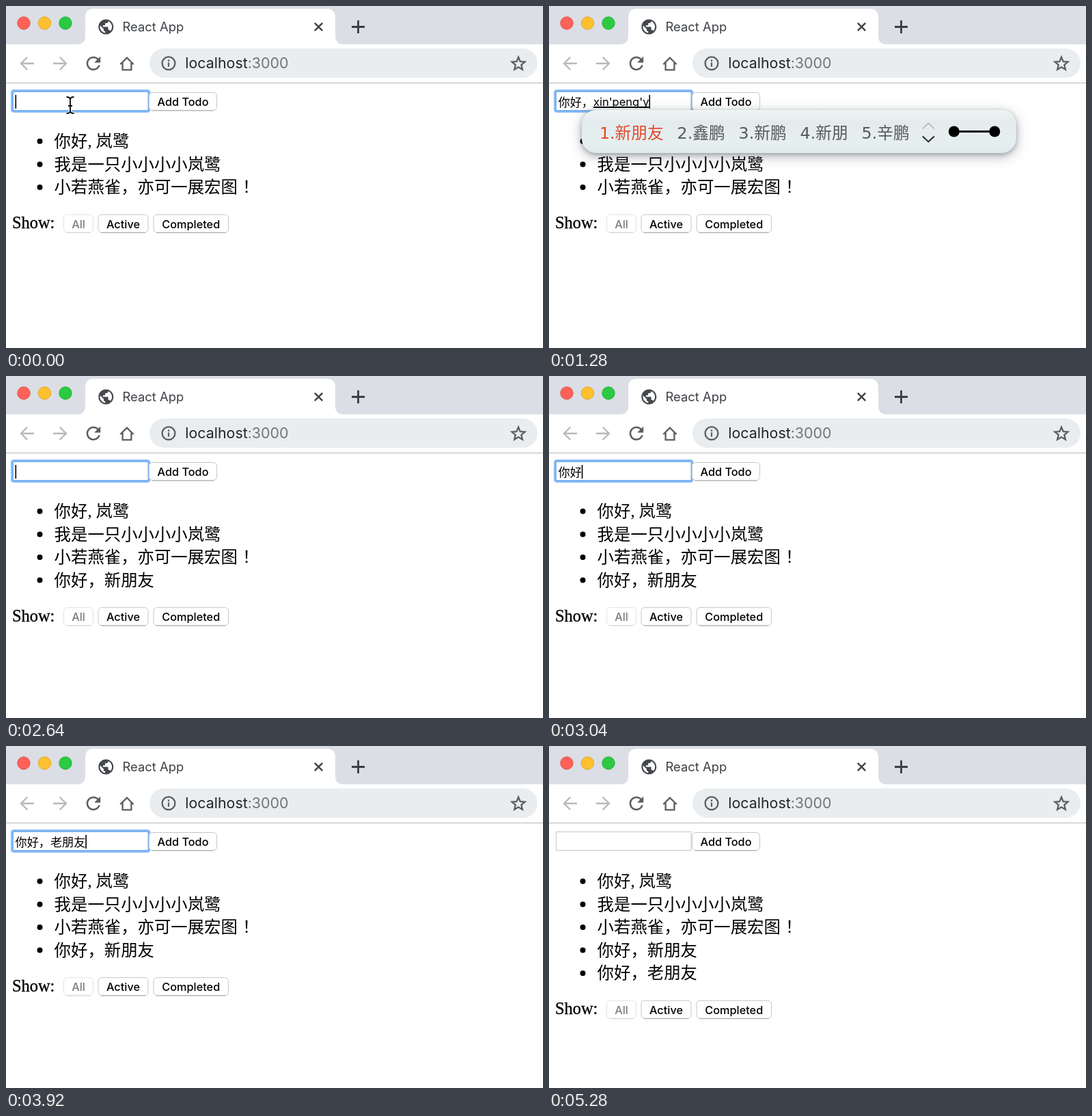
Write an HTML page that moves like this. It is 786 px wide and 500 px high and loops after 5.86 s.

```html
<!DOCTYPE html>
<html lang="zh-CN">
<head>
<meta charset="utf-8">
<title>React App</title>
<style>
  html, body { margin: 0; width: 100%; height: 100%; overflow: hidden; background: #fff; }
  svg { display: block; width: 786px; height: 500px; }
  text { font-family: Inter, "Noto Sans CJK SC", sans-serif; white-space: pre; }
  .line { fill: none; stroke: #5a5e63; stroke-width: 2.3; }
  .dim { stroke: #b6b9bc; }
  .page text { font: 24.4px "Liberation Serif", "Noto Sans CJK SC", serif; }
  .page .btn text { font: 500 16.3px Inter, sans-serif; text-anchor: middle; }
  .typed { font: 16.5px Inter, sans-serif; }
  .btn rect { fill: #fff; stroke: #c6c6c6; }
  .btn path { stroke: #adadad; }
  .off { opacity: .5; }
  .label { stroke: #000; stroke-width: .35; }
  #done { font: 17.15px "Noto Sans CJK SC", sans-serif; }
  #cands { font: 23.7px "Noto Sans CJK SC", sans-serif; fill: #56595b; }
  #cands .num { font-family: "DejaVu Sans", sans-serif; }
  #cands .hot { fill: #e0492b; }
  #pane { filter: drop-shadow(0 2px 3px rgba(40, 50, 55, .3)) drop-shadow(0 4px 9px rgba(40, 50, 55, .32)); }
</style>
</head>
<body>
<svg viewBox="0 0 786 500">
  <defs>
    <linearGradient id="glass" x2="0" y2="1">
      <stop offset="0" stop-color="#eff4f5"/>
      <stop offset=".3" stop-color="#e4ebed"/>
      <stop offset=".75" stop-color="#e6eff0"/>
      <stop offset="1" stop-color="#dfe8ea"/>
    </linearGradient>
  </defs>

  <rect width="786" height="56" fill="#dbdee5"/>
  <path fill="#fff" d="M104 56q12 0 12-12V17q0-13 13-13h340q13 0 13 13v27q0 12 12 12z"/>
  <g stroke-width="1">
    <circle cx="26" cy="25" r="9.2" fill="#fd6158" stroke="#e4524a"/>
    <circle cx="56.5" cy="25" r="9.2" fill="#fec02f" stroke="#e2a828"/>
    <circle cx="87" cy="25" r="9.2" fill="#2bca42" stroke="#24b038"/>
  </g>
  <path fill="#45484c" transform="translate(133.1 17.3) scale(1.1)" d="M12 2C6.48 2 2 6.48 2 12s4.48 10 10 10 10-4.48 10-10S17.52 2 12 2zm-1 17.93c-3.95-.49-7-3.85-7-7.93 0-.62.08-1.21.21-1.79L9 15v1c0 1.1.9 2 2 2v1.93zm6.9-2.54c-.26-.81-1-1.39-1.9-1.39h-1v-3c0-.55-.45-1-1-1H8v-2h2c.55 0 1-.45 1-1V7h2c1.1 0 2-.9 2-2v-.41c2.93 1.19 5 4.06 5 7.41 0 2.08-.8 3.97-2.1 5.39z"/>
  <text x="170.5" y="36.7" font-size="18.4" fill="#3d4045">React App</text>
  <path d="M451.8 24.8l11.4 11.4m0-11.4l-11.4 11.4" stroke="#3f4347" stroke-width="2.4"/>
  <path d="M506 30.5h19m-9.5-9.5v19" stroke="#3a3d43" stroke-width="2.8"/>

  <path class="line dim" d="M41 84H22m9.3-9.3L22 84l9.3 9.3"/>
  <path class="line dim" d="M69 84h19m-9.3-9.3L88 84l-9.3 9.3"/>
  <path fill="#5a5e63" transform="translate(112.6 68.6) scale(1.28)" d="M17.65 6.35C16.2 4.9 14.21 4 12 4c-4.42 0-8 3.58-8 8s3.58 8 8 8c3.73 0 6.84-2.55 7.73-6h-2.08c-.82 2.33-3.04 4-5.65 4-3.31 0-6-2.69-6-6s2.69-6 6-6c1.66 0 3.14.69 4.22 1.78L13 11h7V4z"/>
  <path class="line" d="M167.3 85.3l9.7-9.6 9.7 9.6M170.6 83v10.4h12.8V83"/>
  <rect x="210" y="62" width="568" height="43" rx="21.5" fill="#eaedef"/>
  <circle class="line" cx="238" cy="83.8" r="9.4"/>
  <path d="M238 82.5v6.3m0-10.2v2.3" stroke="#5a5e63" stroke-width="2.2"/>
  <text x="262.3" y="91.2" font-size="21.4" fill="#222528">localhost<tspan fill="#72767a">:3000</tspan></text>
  <path id="star" class="line"/>
  <path d="M0 112.5h786" stroke="#b8b8b8"/>

  <g class="page">
    <g id="ring" fill="none">
      <rect x="8.25" y="123.25" width="202" height="31.5" rx="3.5" stroke="#a9cdf8" stroke-width="3"/>
      <rect x="9.5" y="124.5" width="199.5" height="29" rx="2" stroke="#7db3f4" stroke-width="3"/>
    </g>
    <rect id="box" x="10.5" y="125.5" width="197.5" height="27" fill="none" stroke="#c9c9c9"/>
    <g id="add"></g>
    <g id="list"></g>
    <g id="show"><text class="label" x="9" y="325">Show:</text></g>
  </g>

  <text id="done" x="13.5" y="146.6"></text>
  <text id="comp" class="typed" y="146.2"></text>
  <path id="under" stroke="#000" stroke-width="2"/>
  <rect id="caret" y="130" width="1.6" height="20"/>
  <g id="beam" fill="none">
    <path id="beamHalo" stroke="#fff" stroke-width="4"/>
    <path id="beamCore" stroke="#111" stroke-width="1.9"/>
  </g>

  <g id="panel">
    <rect id="pane" y="152" height="63" rx="21" fill="url(#glass)"/>
    <text id="cands" y="193.6"></text>
    <g id="tools" fill="none">
      <path d="M18.5 179.5l8.5-8 8.5 8" stroke="#b3b8ba" stroke-width="1.7"/>
      <path d="M18.5 190.5l8.5 8 8.5-8" stroke="#222" stroke-width="1.9"/>
      <path d="M64.5 183.5h59.5" stroke="#000" stroke-width="3"/>
      <circle cx="64.5" cy="183.5" r="8" fill="#000"/>
      <circle cx="124" cy="183.5" r="8" fill="#000"/>
    </g>
  </g>
</svg>
<script>
const LOOP = 5860, ROW = 33.6;
const $ = id => document.getElementById(id);
const set = (id, attrs) => { for (const k in attrs) $(id).setAttribute(k, attrs[k]); };
const show = (id, on) => { $(id).style.display = on ? '' : 'none'; };

const todos = ['你好<tspan>,</tspan><tspan dx="6">岚鹭</tspan>', '我是一只小小小小岚鹭',
  '小若燕雀，亦可一展宏图<tspan dx="7">！</tspan>', '你好，新朋友', '你好，老朋友'];

const words = {
  "n": '你 呢 那 能 年',
  "ni": '你 呢 泥 拟 逆',
  "ni'h": '你好 你会 你还 你和 你号',
  "ni'ha": '你好 你还 你哈 拟好 你号',
  "ni'hao": '你好 你号 拟好 (*´\u200a▽｀)ノノ 倪好',
  "x": '想 下 小 新 学',
  "xi": '系 洗 西 喜 细',
  "xin": '新 心 信 欣 辛',
  "xin'p": '新品 新片 心跑 新朋 新票',
  "xin'peng": '新朋 鑫鹏 新鹏 心碰 辛鹏',
  "xin'peng'y": '新朋友 鑫鹏 新鹏 新朋 辛鹏',
  "l": '了 来 啦 里 老',
  "la": '啦 拉 辣 蜡 落',
  "lao": '老 捞 劳 牢 烙',
  "lao'p": '老婆 老朋 老派 老牌 老跑',
  "lao'peng": '老朋 老鹏 捞碰 老棚 劳朋',
  "lao'peng'y": '老朋友 老朋 老鹏 老棚 劳朋'
};

// time, committed text, pinyin, candidate key when it differs from the pinyin
const steps = [
  [0, '', ''],
  [240, '', "n"], [320, '', "ni"], [400, '', "ni'h"], [480, '', "ni'ha"], [560, '', "ni'hao"],
  [720, '你好', ''], [800, '你好，', ''],
  [880, '你好，', "x"], [960, '你好，', "xi"], [1040, '你好，', "xin"], [1120, '你好，', "xin'p"],
  [1200, '你好，', "xin'peng"], [1280, '你好，', "xin'peng'y"], [1360, '你好，', "xin'peng'you", "xin'peng'y"],
  [1440, '你好，新朋友', ''], [1760, '', ''],
  [2720, '', "n"], [2800, '', "ni"], [2880, '', "ni'ha"], [2960, '', "ni'hao"],
  [3040, '你好', ''], [3120, '你好，', ''],
  [3200, '你好，', "l"], [3280, '你好，', "la"], [3360, '你好，', "lao"], [3440, '你好，', "lao'p"],
  [3600, '你好，', "lao'peng"], [3760, '你好，', "lao'peng'y"], [3840, '你好，', "lao'peng'you", "lao'peng'y"],
  [3920, '你好，老朋友', ''], [4320, '', ''], [4640, '', '']
];

const button = (label, x, y, w, off) => `<g class="btn${off ? ' off' : ''}">
  <rect x="${x}" y="${y}" width="${w}" height="26" rx="5"/>
  <path d="M${x + 4} ${y + 26.5}h${w - 8}"/>
  <text x="${x + w / 2}" y="${y + 19.6}">${label}</text></g>`;

const width = el => el.textContent ? el.getComputedTextLength() : 0;

function drawPanel(start, key) {
  const text = $('cands'), x = start + 9;
  text.setAttribute('x', x);
  text.innerHTML = words[key].split(' ').map((word, i) =>
    `<tspan class="num${i ? '' : ' hot'}" dx="${i ? 20 : 0}">${i + 1}.</tspan>` +
    `<tspan class="${i ? '' : 'hot'}">${word}</tspan>`).join('');
  const end = text.getEndPositionOfChar(text.getNumberOfChars() - 1).x + 0.7;
  set('pane', { x: start - 17, width: end + 155.5 - start + 17 });
  set('tools', { transform: `translate(${end} 0)` });
}

function draw([time, done, pinyin, key = pinyin]) {
  const focus = time < 4640;
  const count = 3 + (time >= 1760) + (time >= 4320);
  $('done').textContent = done;
  $('comp').textContent = pinyin;
  const start = 13.5 + width($('done'));
  set('comp', { x: start });
  const end = start + width($('comp'));
  set('under', { d: `M${start} 148H${end}` });
  set('caret', { x: end });
  set('show', { transform: `translate(0 ${(count - 3) * ROW})` });
  [...$('list').children].forEach((row, i) => { row.style.display = i < count ? '' : 'none'; });
  show('beam', time < 240);
  show('caret', focus);
  show('ring', focus);
  show('box', !focus);
  show('under', pinyin);
  show('panel', pinyin);
  if (pinyin) drawPanel(start, key);
}

$('add').innerHTML = button('Add Todo', 209.5, 126.5, 99);
$('show').innerHTML += button('All', 84.5, 305, 43, true) +
  button('Active', 135, 305, 73) + button('Completed', 216, 305, 109.5);
$('list').innerHTML = todos.map((todo, i) => `<g transform="translate(0 ${i * ROW})">
  <circle cx="49.5" cy="197.8" r="4"/><text x="70.6" y="206">${todo}</text></g>`).join('');

const tips = Array.from({ length: 10 }, (_, i) => {
  const r = i % 2 ? 4.5 : 10, a = i * Math.PI / 5;
  return `${750 + r * Math.sin(a)} ${84.8 - r * Math.cos(a)}`;
});
set('star', { d: `M${tips.join('L')}z` });

const beam = 'M88.5 133q5.5 0 5.5 4 0-4 5.5-4M94 137v16M88.5 157q5.5 0 5.5-4 0 4 5.5 4M91 146h6';
set('beamHalo', { d: beam });
set('beamCore', { d: beam });

const begin = performance.now();
let last;
function tick(now) {
  const t = Math.max(0, now - begin) % LOOP;
  const step = steps.findLast(s => s[0] <= t);
  if (step !== last) draw(last = step);
  requestAnimationFrame(tick);
}
tick(begin);
</script>
</body>
</html>
```
